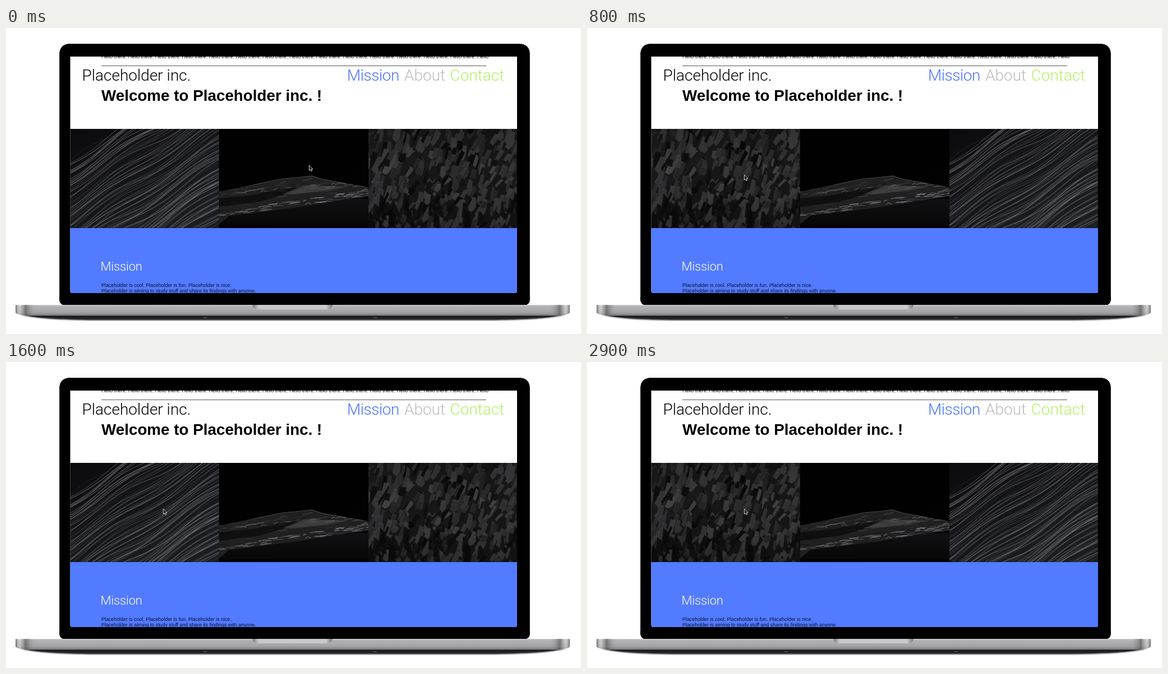
Animation, 1025 px wide and 546 px high, one loop 3 s. Source, as an HTML page with a canvas:

```html
<!DOCTYPE html>
<html lang="en">
<head>
<meta charset="utf-8">
<title>Placeholder inc.</title>
<style>
  html, body { margin: 0; width: 100%; height: 100%; overflow: hidden; background: #fff; }
  #stage { position: absolute; left: 0; top: 0; width: 1025px; height: 546px; overflow: hidden; }
  svg { position: absolute; left: 0; top: 0; }
  canvas { position: absolute; top: 180px; width: 265.5px; height: 177px; }
  #fibres { left: 114.5px; animation: fibres 3s step-end infinite; }
  #ledge { left: 380px; }
  #cliff { left: 645.5px; animation: cliff 3s step-end infinite; }
  #cursor { animation: glide 3s step-end infinite; }
  .light { font-family: Roboto, "Liberation Sans", sans-serif; font-weight: 300; }
  .nav { font-size: 28px; }
  .bold { font: bold 27.8px "Liberation Sans", Arial, sans-serif; }
  .small { font: 8.88px "Liberation Sans", Arial, sans-serif; }

  /* the outer pictures trade places every 750 ms, shown on 100 ms ticks */
  @keyframes fibres {
    0%, 50% { transform: none; }
    26.667%, 76.667% { transform: translateX(531px); }
  }
  @keyframes cliff {
    0%, 50% { transform: none; }
    26.667%, 76.667% { transform: translateX(-531px); }
  }
  @keyframes glide {
    0% { transform: none; }
    3.333% { transform: translate(-19px, 1px); }
    6.667% { transform: translate(-70px, 4px); }
    10% { transform: translate(-130px, 8px); }
    13.333% { transform: translate(-190px, 13px); }
    16.667% { transform: translate(-241px, 16px); }
    20%, 100% { transform: translate(-260px, 17px); }
  }
</style>
</head>
<body>
<div id="stage">
  <svg width="1025" height="546" viewBox="0 0 1025 546">
    <defs>
      <linearGradient id="metal" x1="0" y1="0" x2="0" y2="1">
        <stop offset="0" stop-color="#d2d2d4"/>
        <stop offset=".12" stop-color="#b4b4b6"/>
        <stop offset=".7" stop-color="#a2a2a5"/>
        <stop offset="1" stop-color="#77777a"/>
      </linearGradient>
      <linearGradient id="ends">
        <stop offset="0" stop-color="#555" stop-opacity=".7"/>
        <stop offset=".007" stop-color="#fff" stop-opacity=".35"/>
        <stop offset=".018" stop-color="#444" stop-opacity=".55"/>
        <stop offset=".035" stop-color="#999" stop-opacity="0"/>
        <stop offset=".965" stop-color="#999" stop-opacity="0"/>
        <stop offset=".982" stop-color="#444" stop-opacity=".55"/>
        <stop offset=".993" stop-color="#fff" stop-opacity=".35"/>
        <stop offset="1" stop-color="#555" stop-opacity=".7"/>
      </linearGradient>
      <linearGradient id="notch">
        <stop offset="0" stop-color="#77777a"/>
        <stop offset=".08" stop-color="#c9c9cb"/>
        <stop offset=".92" stop-color="#c9c9cb"/>
        <stop offset="1" stop-color="#77777a"/>
      </linearGradient>
      <filter id="blur" x="-5%" y="-100%" width="110%" height="300%">
        <feGaussianBlur stdDeviation="3 1"/>
      </filter>
      <clipPath id="screen"><path d="M114.5 51H911V469Q911 473 907 473H118.500Q114.500 473 114.500 469Z"/></clipPath>
    </defs>

    <path d="M28 512H996Q960 521 860 521.500H160Q62 521 28 512Z" fill="#222" filter="url(#blur)"/>
    <path d="M95 48Q95 28 115 28H914Q934 28 934 48V483Q934 495 922 495H107Q95 495 95 483Z" fill="#000"/>
    <path d="M95.500 480V48Q95.500 28.500 115 28.500H914Q933.500 28.500 933.500 48V480" fill="none" stroke="#2c2c2e"/>
    <path id="base" d="M17 495Q17 494 18 494H1004Q1005 494 1005 495V508Q1000 513 975 513.500H47Q22 513 17 508Z" fill="url(#metal)"/>
    <use href="#base" style="display:none"/>
    <path d="M17 495Q17 494 18 494H1004Q1005 494 1005 495V508Q1000 513 975 513.500H47Q22 513 17 508Z" fill="url(#ends)"/>
    <path d="M439 494H582Q581 502 571 502H450Q440 502 439 494Z" fill="url(#notch)"/>
    <path d="M38 513.500H984L960 516.500H62Z" fill="#1c1c1d"/>
    <path d="M352 517h6M655 517h6" stroke="#555" stroke-width="1.500"/>

    <g clip-path="url(#screen)">
      <rect x="114" y="51" width="798" height="423" fill="#fff"/>
      <text id="hello" class="small" x="170" y="53.500"></text>
      <path d="M170 67.500H856" stroke="#555"/>
      <g class="light nav">
        <text x="135.500" y="94">Placeholder inc.</text>
        <text x="608" y="94" letter-spacing="-.5" fill="#4c74fb">Mission</text>
        <text x="710" y="94" fill="#bcbcbc">About</text>
        <text x="791.500" y="94" fill="#b1f164">Contact</text>
      </g>
      <text class="bold" x="170" y="129.500">Welcome to Placeholder inc. !</text>
      <rect x="114" y="180" width="798" height="177" fill="#000"/>
      <rect x="114" y="357" width="798" height="117" fill="#527bff"/>
      <text class="light" x="168.500" y="433" font-size="22" letter-spacing="-.2" fill="#fff">Mission</text>
      <g class="small" fill="#0a1230">
        <text x="170" y="462">Placeholder is cool. Placeholder is fun. Placeholder is nice.</text>
        <text x="170" y="472">Placeholder is aiming to study stuff and share its findings with anyone.</text>
      </g>
    </g>
  </svg>

  <canvas id="fibres" width="531" height="354"></canvas>
  <canvas id="ledge" width="531" height="354"></canvas>
  <canvas id="cliff" width="531" height="354"></canvas>

  <svg width="1025" height="546" viewBox="0 0 1025 546">
    <path id="cursor" d="M540.500 245V254.300L542.600 252.400L544 255.600L545.600 254.900L544.200 251.800H547Z"
          fill="#000" stroke="#e8e8e8" stroke-width=".9"/>
  </svg>
</div>

<script>
const W = 265.5, H = 177;

document.getElementById("hello").textContent = "Hello there. ".repeat(14) + "Hello";

function seeded(s) {
  return (a = 0, b = 1) => {
    s = (s * 16807) % 2147483647;
    return a + (b - a) * (s / 2147483647);
  };
}

const gray = (v, a = 1) => `rgba(${v | 0},${v | 0},${(v * 1.03) | 0},${a})`;

function open2d(id, top, bottom) {
  const c = document.getElementById(id).getContext("2d");
  c.scale(2, 2);
  const g = c.createLinearGradient(0, 0, W * .4, H);
  g.addColorStop(0, top);
  g.addColorStop(1, bottom);
  c.fillStyle = g;
  c.fillRect(0, 0, W, H);
  return c;
}

function shape(c, pts) {
  c.beginPath();
  pts.forEach(([x, y]) => c.lineTo(x, y));
  c.closePath();
}

function drawFibres() {
  const c = open2d("fibres", "#0b0b0e", "#1b1c20"), r = seeded(71);
  for (let i = 0; i < 100; i++) {
    const start = 62 + 285 * i / 100 + r(-5, 5);
    const slope = r(.6, .72), amp = r(3, 7), phase = r(-.6, .6) + start * .012;
    c.beginPath();
    for (let x = -4; x <= W + 4; x += 4)
      c.lineTo(x, start - slope * x + amp * Math.sin(x * .035 + phase));
    c.strokeStyle = gray(r(105, 205), r(.25, .75));
    c.lineWidth = r(.4, 1);
    c.stroke();
  }
  // one loose strand in the dark corner
  c.beginPath();
  c.moveTo(0, 58);
  c.quadraticCurveTo(30, 22, 105, 5);
  c.strokeStyle = gray(95, .5);
  c.lineWidth = .5;
  c.stroke();
}

function drawLedge() {
  const c = open2d("ledge", "#010101", "#020202"), r = seeded(29);
  const floor = c.createLinearGradient(0, 125, 0, H);
  floor.addColorStop(0, "#111113");
  floor.addColorStop(1, "#060607");
  c.fillStyle = floor;
  c.fillRect(0, 125, W, 47);

  c.save();
  shape(c, [[0, 112], [38, 104], [72, 97], [112, 89], [145, 86], [165, 83], [182, 89],
            [222, 96], [W, 104], [W, 120], [205, 129], [140, 140], [75, 148], [18, 155], [0, 170]]);
  c.clip();
  c.fillStyle = "#202021";
  c.fillRect(0, 80, W, 95);
  const streak = (count, mid, spread, lo, hi, alpha) => {
    for (let i = 0; i < count; i++) {
      const x = r(-10, W), y = mid(x) + r(-spread, spread), w = r(6, 24);
      c.beginPath();
      c.moveTo(x, y);
      c.lineTo(x + w * .5, y - r(0, 3));
      c.lineTo(x + w, y - r(0, 4));
      c.strokeStyle = gray(r(lo, hi), alpha);
      c.lineWidth = r(.5, 2);
      c.stroke();
    }
  };
  streak(130, x => 122 - x * .04, 26, 12, 80, .6);
  streak(55, x => 153 - x * .15, 5, 85, 160, .55);
  streak(30, x => 116 - x * .07, 4, 90, 140, .5);
  shape(c, [[0, 124], [60, 118], [118, 106], [165, 100], [120, 116], [70, 130], [0, 139]]);
  c.fillStyle = "rgba(8,8,8,.7)";
  c.fill();
  shape(c, [[112, 117], [150, 101], [190, 102], [230, 103], [190, 110], [148, 115]]);
  c.fillStyle = "rgba(76,76,77,.65)";
  c.fill();
  c.restore();

  c.beginPath();
  [[60, 100], [112, 89], [145, 86], [165, 84], [184, 90], [225, 98]].forEach(p => c.lineTo(...p));
  c.strokeStyle = gray(125, .6);
  c.lineWidth = .8;
  c.stroke();
}

function drawCliff() {
  const c = open2d("cliff", "#1d1d1e", "#171718"), r = seeded(113);
  for (let row = 0; row < 12; row++) {
    for (let col = 0; col < 29; col++) {
      const x = col * 9.6 + r(-8, 6), y = row * 15.5 + r(-12, 8);
      const w = r(5, 14), h = r(13, 32), lean = r(2, 12);
      shape(c, [[x + lean, y], [x + lean + w * .7, y + r(0, 5)], [x + w, y + h * .7],
                [x + w * .45, y + h], [x, y + h * .75]]);
      const dark = r() < .28;
      c.fillStyle = gray(dark ? r(9, 25) : r(36, 66));
      c.fill();
      if (!dark) {
        c.beginPath();
        c.moveTo(x, y + h * .75);
        c.lineTo(x + lean, y);
        c.lineTo(x + lean + w * .7, y + 3);
        c.strokeStyle = gray(r(70, 110), .5);
        c.lineWidth = .6;
        c.stroke();
      }
    }
  }
  // gaps between the lower slabs
  for (let i = 0; i < 22; i++) {
    const x = r(0, W), y = r(112, 150);
    shape(c, [[x, y], [x + r(4, 9), y + 6], [x + r(6, 14), y + r(24, 44)], [x - 3, y + 26]]);
    c.fillStyle = gray(12, .8);
    c.fill();
  }
  const shade = c.createLinearGradient(0, 0, 0, H);
  shade.addColorStop(0, "rgba(0,0,0,.22)");
  shade.addColorStop(.4, "rgba(0,0,0,0)");
  shade.addColorStop(1, "rgba(0,0,0,.25)");
  c.fillStyle = shade;
  c.fillRect(0, 0, W, H);
}

drawFibres();
drawLedge();
drawCliff();
</script>
</body>
</html>
```
